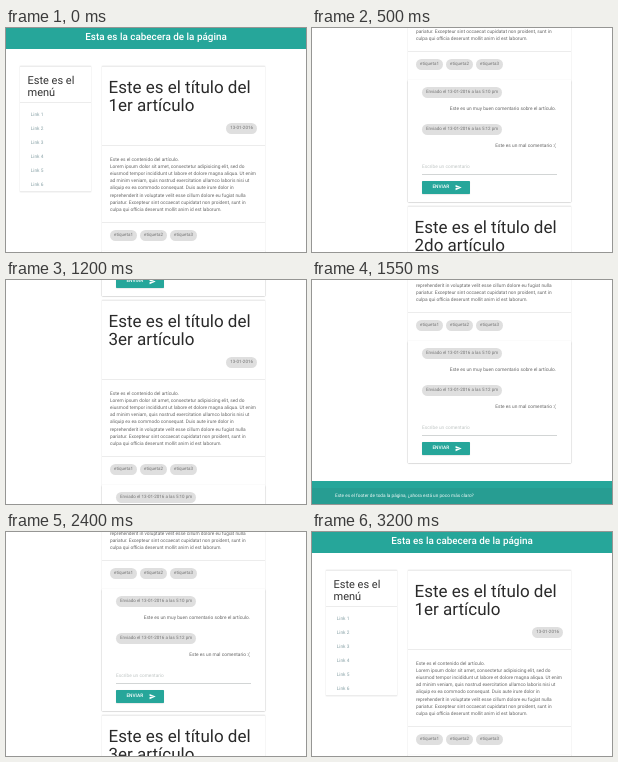
Animation, 300 px wide and 224 px high, one loop 3700 ms. Source, as an HTML page:

```html
<!DOCTYPE html>
<html lang="es">
<head>
<meta charset="utf-8">
<title>Página con artículos</title>
<style>
  * { box-sizing: border-box; }
  html, body { margin: 0; width: 100%; height: 100%; overflow: hidden; background: #fff; }
  #stage {
    position: relative; width: 300px; height: 224px; overflow: hidden; background: #fff;
    font: 400 4.8px/7.15px Roboto, sans-serif; color: #666;
    text-rendering: geometricPrecision;
  }
  #page { position: absolute; left: 0; top: 0; width: 300px; height: 1008px; will-change: transform; }
  #page * { position: absolute; white-space: nowrap; margin: 0; }
  #page br { position: static; }

  header {
    left: 0; top: 0; width: 300px; height: 21px; background: #26a69a; color: #fff;
    font-size: 9.9px; font-weight: 500; line-height: 20.5px; text-align: center;
  }
  .card { background: #fff; box-shadow: 0 0 1.5px rgba(0, 0, 0, .14); }
  .line { left: 0; width: 100%; height: 1px; background: #ececec; }

  nav { left: 14px; top: 38px; width: 71px; height: 126px; }
  nav h2 { left: 7.5px; top: 9px; font-size: 11px; line-height: 12.2px; font-weight: 400; color: #333; }
  nav a { left: 10.7px; color: #8aa3a8; }

  article { left: 96px; width: 163px; height: 307px; }
  h1 { left: 6.5px; top: 12.5px; font-size: 17px; line-height: 18.6px; font-weight: 400; color: #2a2a2a; }
  article p { left: 8px; }
  .chip {
    height: 11px; padding: 0 4px; border-radius: 5.5px; background: #dfdfdf; color: #757575;
    font-size: 4.5px; line-height: 11px; text-align: center;
  }
  .date { right: 8px; top: 57px; }
  .tag { top: 164px; width: 27px; padding: 0; }

  .form {
    left: 0; top: 185px; width: 163px; height: 122px; background: #fff;
    box-shadow: 0 .7px 1.5px rgba(0, 0, 0, .22), 0 0 1px rgba(0, 0, 0, .1);
  }
  .sent { left: 14px; }
  .form .said { left: auto; right: 15px; }
  .form .hint { left: 14px; top: 84.2px; color: #c0c6c5; }
  .field { left: 14px; top: 94px; width: 135px; height: 1px; background: #d2d5d5; }
  .send {
    left: 14px; top: 101px; width: 48px; height: 12.5px; border-radius: .7px;
    background: #26a69a; color: #fff; font-weight: 500; line-height: 13px;
    box-shadow: 0 .5px 1px rgba(0, 0, 0, .15);
  }
  .send b { left: 10.4px; top: 0; font-weight: 500; }
  .send svg { left: 33px; top: 3px; width: 7px; height: 7px; fill: #fff; }

  footer { left: 0; top: 985px; width: 300px; height: 23px; background: #26a69a; }
  footer p {
    left: 0; top: 7px; width: 300px; height: 16px; padding-left: 23px;
    background: #279d92; color: #f0f9f8; font-size: 4.7px; line-height: 17.6px;
  }
</style>
</head>
<body>
<div id="stage">
  <div id="page">
    <header>Esta es la cabecera de la página</header>
    <nav class="card">
      <div class="line" style="top:0"></div>
      <h2>Este es el<br>menú</h2>
      <div class="line" style="top:36px"></div>
      <div class="line" style="top:125px"></div>
    </nav>
    <footer><p>Este es el footer de toda la página, ¿ahora está un poco más claro?</p></footer>
  </div>
</div>
<script>
  const page = document.getElementById('page');
  const add = (parent, html) => parent.insertAdjacentHTML('beforeend', html);

  const body = [
    'Este es el contenido del artículo.',
    'Lorem ipsum dolor sit amet, consectetur adipisicing elit, sed do',
    'eiusmod tempor incididunt ut labore et dolore magna aliqua. Ut enim',
    'ad minim veniam, quis nostrud exercitation ullamco laboris nisi ut',
    'aliquip ex ea commodo consequat. Duis aute irure dolor in',
    'reprehenderit in voluptate velit esse cillum dolore eu fugiat nulla',
    'pariatur. Excepteur sint occaecat cupidatat non proident, sunt in',
    'culpa qui officia deserunt mollit anim id est laborum.'
  ].join('<br>');

  const line = y => `<div class="line" style="top:${y}px"></div>`;
  const tag = n => `<div class="chip tag" style="left:${8 + 30 * (n - 1)}px">etiqueta${n}</div>`;
  const comment = (y, time, text) => `
    <div class="chip sent" style="top:${y}px">Enviado el 13-01-2016 a las ${time} pm</div>
    <p class="said" style="top:${y + 18.7}px">${text}</p>`;

  const article = (ordinal, i) => `
    <article class="card" style="top:${38 + 311 * i}px">
      ${line(0)}
      <h1>Este es el título del<br>${ordinal} artículo</h1>
      <div class="chip date">13-01-2016</div>
      ${line(79)}
      <p style="top:90.8px">${body}</p>
      ${line(156)}
      ${[1, 2, 3].map(tag).join('')}
      <section class="form">
        ${comment(7, '5:10', 'Este es un muy buen comentario sobre el artículo.')}
        ${comment(44, '5:12', 'Este es un mal comentario :(')}
        <p class="hint">Escribe un comentario</p>
        <div class="field"></div>
        <div class="send"><b>ENVIAR</b><svg viewBox="0 0 24 24"><path d="M2 21 23 12 2 3v7l15 2-15 2z"/></svg></div>
      </section>
    </article>`;

  for (let n = 1; n <= 6; n++)
    add(page.querySelector('nav'), `<a style="top:${45.5 + 14 * (n - 1)}px">Link ${n}</a>`);
  add(page, ['1er', '2do', '3er'].map(article).join(''));

  // Scroll keys: time in ms, offset in px, speed in px/ms
  const keys = [
    [0, 0, 0], [500, 171, .48], [1200, 640, .55], [1550, 784, 0],
    [2000, 784, 0], [2000, 784, -.75], [2400, 477, -.64], [2900, 179, -.6], [3200, 0, -.56],
    [3200, 0, 0], [3700, 0, 0]
  ];
  const LOOP = 3700, TICK = 50;

  function scrollAt(t) {
    const i = keys.findIndex(k => t < k[0]);
    const [t0, y0, v0] = keys[i - 1], [t1, y1, v1] = keys[i];
    const d = t1 - t0, u = (t - t0) / d, w = 1 - u;
    return w * w * ((1 + 2 * u) * y0 + u * d * v0) + u * u * ((3 - 2 * u) * y1 - w * d * v1);
  }

  const start = performance.now();
  function draw() {
    const t = (performance.now() - start) % LOOP;
    const y = Math.round(scrollAt(Math.floor(t / TICK) * TICK));
    page.style.transform = `translateY(${-y}px)`;
    requestAnimationFrame(draw);
  }
  draw();
</script>
</body>
</html>
```
